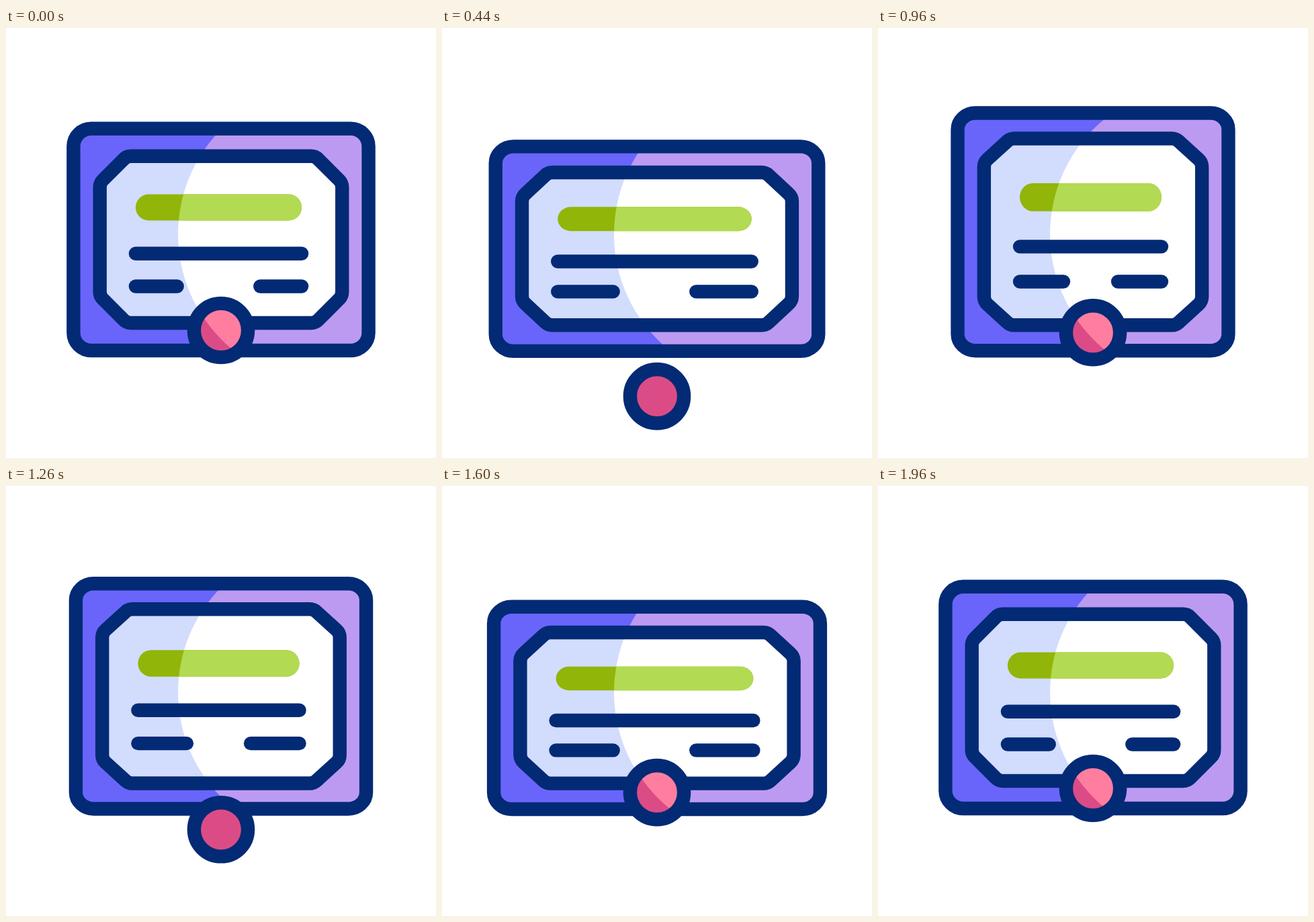
An HTML page with a canvas for the animation above (2.42 s loop, 640x640 px).

```html
<!DOCTYPE html>
<html lang="en">
<head>
<meta charset="utf-8">
<title>Certificate</title>
<style>
html, body { margin: 0; width: 100%; height: 100%; overflow: hidden; background: #fff; }
canvas { display: block; }
</style>
</head>
<body>
<canvas width="640" height="640"></canvas>
<script>
const ctx = document.querySelector('canvas').getContext('2d');
const LOOP = 2420, MID = 320, TEXT_MID = 316.5, ANCHOR = 484;

// Each pose: stretch (-1 flat, 1 tall), tightness of the border, shortening of the lines
const rest = [0, 0, 0], flat = [-1, 1, 0], tall = [1, 1, 1];
const bodyKeys = [[67, rest], [595, flat], [1080, tall], [1478, flat], [1510, flat], [1965, rest]];
const sealKeys = [[0, [450]], [508, [553]], [545, [553]], [1040, [446]], [1297, [515]],
  [1545, [449.5]], [1650, [461.5]], [1850, [450]]];

// Eased values between the two keys around t.
function valuesAt(keys, t) {
  const next = keys.findIndex(k => k[0] > t);
  if (next < 0) return keys[keys.length - 1][1];
  if (next === 0) return keys[0][1];
  const [t0, a] = keys[next - 1], [t1, b] = keys[next];
  const s = (t - t0) / (t1 - t0), e = s * s * (3 - 2 * s);
  return a.map((v, i) => v + (b[i] - v) * e);
}

// Fills a shape in its shaded colour, then the lit part inside a fixed disc.
function fillLit(path, dark, light) {
  ctx.fillStyle = dark;
  ctx.fill(path);
  ctx.save();
  ctx.beginPath();
  ctx.arc(478, 307, 222, 0, 7);
  ctx.clip();
  ctx.fillStyle = light;
  ctx.fill(path);
  ctx.restore();
}

function roundBox(mid, left, top, bottom, rx, ry) {
  const p = new Path2D();
  p.roundRect(left, top, 2 * (mid - left), bottom - top, { x: rx, y: ry });
  return p;
}

// Box with cut corners, w wide and h high.
function panelBox(l, t, b, w, h) {
  const r = 2 * MID - l;
  const pts = [[l + w, t], [r - w, t], [r, t + h], [r, b - h],
    [r - w, b], [l + w, b], [l, b - h], [l, t + h]];
  const p = new Path2D();
  p.moveTo(MID, t);
  for (let i = 1; i <= 8; i++) p.arcTo(...pts[i % 8], ...pts[(i + 1) % 8], 15);
  p.closePath();
  return p;
}

function rule(x0, x1, y) {
  ctx.beginPath();
  ctx.moveTo(x0, y);
  ctx.lineTo(x1, y);
  ctx.stroke();
}

function draw(t) {
  const [stretch, tight, short] = valuesAt(bodyKeys, t);
  const [sealY] = valuesAt(sealKeys, t);
  const scaleY = y => ANCHOR + (y - ANCHOR) * (1 + 0.1 * stretch);

  ctx.clearRect(0, 0, 640, 640);
  ctx.strokeStyle = '#032a75';
  ctx.lineWidth = 20.4;
  ctx.lineCap = 'round';

  const left = 100.4 + 26 * stretch, top = scaleY(149.8);
  const bottom = 480 + 0.6 * tight - 0.5 * stretch;
  const frame = roundBox(MID, left, top, bottom, 26.5, 26.5 - 2 * tight);
  fillLit(frame, '#6965fa', '#bc9af2');
  ctx.stroke(frame);

  const gap = 41 - 3 * tight;
  const panel = panelBox(left + 39.3, top + gap, bottom - gap, 40 - tight, 40 - 4.5 * tight);
  fillLit(panel, '#d2dcfd', '#fff');
  ctx.stroke(panel);

  const textLeft = left + 92.5, textRight = 2 * TEXT_MID - textLeft;
  const barTop = scaleY(247.5), barBottom = scaleY(286.5);
  const bar = roundBox(TEXT_MID, textLeft, barTop, barBottom, 19.5, (barBottom - barTop) / 2);
  fillLit(bar, '#91b508', '#b2da53');

  const shortY = scaleY(384.5), shortEnd = 254.7 + 25 * short;
  rule(textLeft, textRight, scaleY(335.7));
  rule(textLeft, shortEnd, shortY);
  rule(2 * TEXT_MID - shortEnd, textRight, shortY);

  const seal = new Path2D();
  seal.arc(MID, sealY, 40.1, 0, 7);
  fillLit(seal, '#db4c86', '#ff7ea0');
  ctx.stroke(seal);
}

const start = performance.now();
function tick() {
  draw((performance.now() - start) % LOOP);
  requestAnimationFrame(tick);
}
tick();
</script>
</body>
</html>
```
